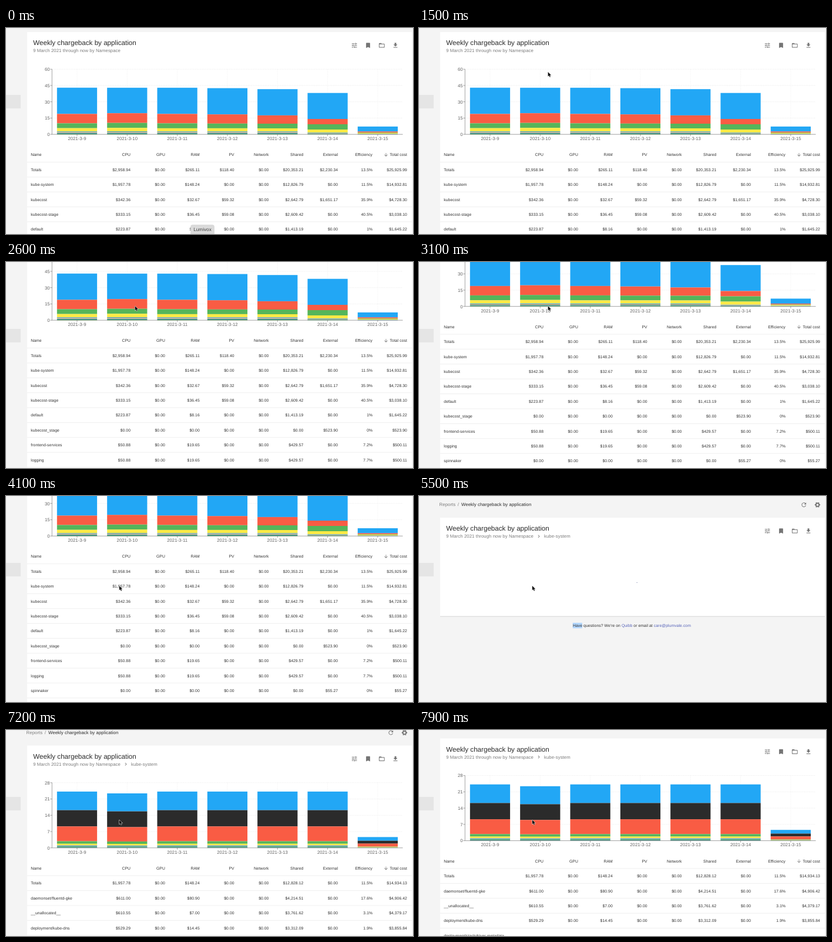
An HTML page for the animation above (8000 ms loop, 693 px wide and 351 px high).

```html
<!DOCTYPE html>
<html lang="en">
<head>
<meta charset="utf-8">
<title>Weekly chargeback report</title>
<style>
  html, body { margin: 0; width: 100%; height: 100%; overflow: hidden; background: #f4f4f4; }
  svg { display: block; width: 693px; height: 351px; font-family: "Liberation Sans", Arial, Helvetica, sans-serif; }
  text { white-space: pre; text-rendering: geometricPrecision; }
  .h5 { font-size: 11.64px; fill: #2a2a2a; }
  .body1 { font-size: 7.76px; letter-spacing: .073px; }
  .body2 { font-size: 6.79px; letter-spacing: .073px; fill: #303030; }
  .axis { font-size: 7.76px; fill: #666; }
  .grey { fill: #7c7c7c; }
  .dark { fill: #2a2a2a; }
  .link { fill: #5562b8; }
</style>
</head>
<body>
<svg id="stage" viewBox="0 0 693 351"></svg>
<script>
const NS = 'http://www.w3.org/2000/svg';
const LOOP = 8000, STEP = 100;
const OPEN = 5500, LOADED = 6300, GROWN = 6700, TIP_END = 300;
const U = 0.485; // page zoom

const add = (parent, tag, attrs = {}, content) => {
  const el = document.createElementNS(NS, tag);
  for (const k in attrs) el.setAttribute(k, attrs[k]);
  if (content !== undefined) el.textContent = content;
  parent.appendChild(el);
  return el;
};
const group = (parent, transform) => add(parent, 'g', transform ? { transform } : {});
const rect = (parent, x, y, width, height, fill, more = {}) =>
  add(parent, 'rect', { x, y, width, height, fill, ...more });
const label = (parent, x, y, str, cls, anchor = 'start') =>
  add(parent, 'text', { x, y, class: cls, 'text-anchor': anchor }, str);
const line = (parent, x1, y1, x2, y2, stroke, more = {}) =>
  add(parent, 'line', { x1, y1, x2, y2, stroke, 'stroke-width': 0.6, ...more });
const icon = (parent, cx, cy, d, scale = U, fill = '#757575') =>
  add(parent, 'path', { d, fill, transform: `translate(${cx} ${cy}) scale(${scale}) translate(-12 -12)` });
const show = (el, on) => el.setAttribute('visibility', on ? 'visible' : 'hidden');

const ICONS = {
  tune: 'M3 17v2h6v-2H3zM3 5v2h10V5H3zm10 16v-2h8v-2h-8v-2h-2v6h2zM7 9v2H3v2h4v2h2V9H7zm14 4v-2H11v2h10zm-6-4h2V7h4V5h-4V3h-2v6z',
  bookmark: 'M17 3H7c-1.1 0-2 .9-2 2v16l7-3 7 3V5c0-1.1-.9-2-2-2z',
  folder: 'M20 6h-8l-2-2H4c-1.1 0-2 .9-2 2v12c0 1.1.9 2 2 2h16c1.1 0 2-.9 2-2V8c0-1.1-.9-2-2-2zm0 12H4V8h16v10z',
  download: 'M19 9h-4V3H9v6H5l7 7 7-7zM5 18v2h14v-2H5z',
  refresh: 'M17.65 6.35A8 8 0 1 0 19.73 14h-2.08A6 6 0 1 1 16.22 7.78L13 11h7V4z',
  next: 'M10 6L8.59 7.41 13.17 12l-4.58 4.59L10 18l6-6z',
  down: 'M20 12l-1.41-1.41L13 16.17V4h-2v12.17l-5.58-5.59L4 12l8 8 8-8z'
};

const BLUE = '#22a7f5', RED = '#f95c44', GREEN = '#55b55a', YELLOW = '#ffea45', BLACK = '#2b2b2b';
const HEAD = ['CPU', 'GPU', 'RAM', 'PV', 'Network', 'Shared', 'External', 'Efficiency', 'Total cost'];

// Each bar lists the heights of its segment tops above the axis.
const overview = {
  ticks: [0, 15, 30, 45, 60],
  colors: [BLUE, RED, GREEN, YELLOW, '#35a0d8', '#e9a655', '#3a93b4', '#3f9f58'],
  bars: [
    [79.5, 34.8, 18.8, 10.5, 5], [79.4, 36, 19.5, 11, 5.2], [79.4, 34.8, 18.8, 10.3, 5],
    [78.7, 34, 18.4, 10.3, 5], [77, 32.3, 18.2, 10.2, 5], [70.5, 26.2, 17.2, 8.2, 3],
    [13.3, 4.8, 3.2, 2.4, 1]
  ],
  rows: [
    'Totals|2,958.94|0.00|265.11|118.40|0.00|20,353.21|2,230.34|13.5%|25,925.99',
    'kube-system|1,957.78|0.00|148.24|0.00|0.00|12,826.79|0.00|11.5%|14,932.81',
    'kubecost|342.36|0.00|32.67|59.32|0.00|2,642.79|1,651.17|35.9%|4,728.30',
    'kubecost-stage|333.15|0.00|36.45|59.08|0.00|2,609.42|0.00|40.5%|3,038.10',
    'default|223.87|0.00|8.16|0.00|0.00|1,413.19|0.00|1%|1,645.22',
    'kubecost_stage|0.00|0.00|0.00|0.00|0.00|0.00|523.90|0%|523.90',
    'frontend-services|50.88|0.00|19.65|0.00|0.00|429.57|0.00|7.2%|500.11',
    'logging|50.88|0.00|19.65|0.00|0.00|429.57|0.00|7.7%|500.11',
    'spinnaker|0.00|0.00|0.00|0.00|0.00|0.00|55.27|0%|55.27'
  ]
};
const fullDay = [95.9, 64.2, 36.5, 11.3, 7, 4.2];
const detail = {
  ticks: [0, 7, 14, 21, 28],
  colors: [BLUE, BLACK, RED, GREEN, YELLOW, '#6f9fc4', '#58b574', '#3b8f86'],
  bars: [
    fullDay, [92.8, 62.2, 35.3, 10.9, 6.8, 4], fullDay, fullDay, fullDay, fullDay,
    [18.4, 12.1, 7.2, 2.1, 1.5, 0.8]
  ],
  rows: [
    'Totals|1,957.78|0.00|148.24|0.00|0.00|12,828.12|0.00|11.5%|14,934.13',
    'daemonset/fluentd-gke|611.00|0.00|80.90|0.00|0.00|4,214.51|0.00|17.6%|4,906.42',
    '__unallocated__|610.55|0.00|7.00|0.00|0.00|3,761.62|0.00|3.1%|4,379.17',
    'deployment/kube-dns|529.29|0.00|14.45|0.00|0.00|3,312.09|0.00|1.9%|3,855.84',
    'deployment/stackdriver-metadata-'
  ]
};

const AX = { left: 78.3, right: 675.6, top: 100.2, base: 211.2 };

function drawChart(parent, data) {
  const band = (AX.right - AX.left) / 7, gap = band * 0.1;
  const unit = (AX.base - AX.top) / 4;
  const dash = { 'stroke-dasharray': '1.45 1.45' };
  data.ticks.forEach((v, i) => {
    const y = AX.base - i * unit;
    if (i) line(parent, AX.left, y, AX.right, y, '#e2e2e2', dash);
    line(parent, AX.left - 3, y, AX.left, y, '#666');
    label(parent, 74.5, y + 2.8, v, 'axis', 'end');
  });
  data.bars.forEach((_, i) => {
    const x = AX.left + (i + 0.5) * band;
    line(parent, x, AX.top, x, AX.base, '#ececec', dash);
  });
  const segments = [];
  data.bars.forEach((tops, i) => {
    const last = tops.length - 1, thin = data.colors.length - last;
    const levels = data.colors.map((_, k) =>
      k <= last ? tops[k] : tops[last] * (1 - (k - last) / thin));
    levels.push(0);
    data.colors.forEach((color, k) => {
      const low = levels[k + 1], h = levels[k] - low;
      const el = rect(parent, AX.left + i * band + gap, AX.base - low - h, band * 0.8, h, color);
      segments.push({ el, low, h });
    });
  });
  line(parent, AX.left, AX.top, AX.left, AX.base, '#666');
  line(parent, AX.left, AX.base, AX.right, AX.base, '#666');
  data.bars.forEach((_, i) => {
    const x = AX.left + (i + 0.5) * band;
    line(parent, x, AX.base, x, AX.base + 3, '#666');
    label(parent, x, AX.base + 9.8, '2021-3-' + (9 + i), 'axis', 'middle');
  });
  return p => segments.forEach(({ el, low, h }) => {
    el.setAttribute('y', AX.base - low - h * p);
    el.setAttribute('height', h * p);
  });
}

function drawTable(parent, rows) {
  const right = i => 212 + i * 58.87;
  const pitch = 25.39, top = 248.4;
  label(parent, 42.3, top, 'Name', 'body2');
  HEAD.forEach((h, i) => label(parent, right(i), top, h, 'body2', 'end'));
  icon(parent, 647, 246, ICONS.down, 0.36);
  line(parent, 36, top + 10.2, 691, top + 10.2, '#e4e4e4');
  rows.forEach((row, r) => {
    const [name, ...cells] = row.split('|');
    const y = top + (r + 1) * pitch;
    label(parent, 42.3, y, name, 'body2');
    cells.forEach((c, i) =>
      label(parent, right(i), y, c.endsWith('%') ? c : '$' + c, 'body2', 'end'));
    if (cells.length) line(parent, 36, y + 10.2, 691, y + 10.2, '#e4e4e4');
  });
}

const stage = document.getElementById('stage');
rect(stage, 0, 0, 693, 351, '#f4f4f4');
rect(stage, 0, 114, 25, 23, '#e5e5e5');
const page = group(stage);

// Header
label(page, 34.6, 17.4, 'Reports', 'body1 grey');
label(page, 65.8, 17.4, '/', 'body1 grey');
label(page, 72, 17.4, 'Weekly chargeback by application', 'body1 dark');
icon(page, 655.3, 15, ICONS.refresh);
const gear = group(page, 'translate(678.5 15)');
add(gear, 'circle', { r: 2.8, fill: 'none', stroke: '#757575', 'stroke-width': 1.9 });
add(gear, 'circle', { r: 4.1, fill: 'none', stroke: '#757575', 'stroke-width': 1.2, pathLength: 12, 'stroke-dasharray': '.9 1.1', 'stroke-dashoffset': 0.45 });

// Card
const cardShadow = rect(page, 36, 204.6, 655, 0.8, '#bdbdbd');
const card = rect(page, 36, 37, 655, 167.6, '#fff');
label(page, 46.2, 59.3, 'Weekly chargeback by application', 'h5');
label(page, 46.2, 71.4, '9 March 2021 through now by Namespace', 'body1 grey');
const crumb = group(page);
icon(crumb, 204, 68.7, ICONS.next, 0.42);
label(crumb, 213, 71.4, 'kube-system', 'body1 grey');
['tune', 'bookmark', 'folder', 'download'].forEach((name, i) =>
  icon(page, 593.2 + i * 23.3, 59.6, ICONS[name]));

const first = group(page);
drawChart(first, overview);
drawTable(first, overview.rows);
const second = group(page);
const growBars = drawChart(second, detail);
drawTable(second, detail.rows);

// Loading state
const waiting = group(page);
rect(waiting, 261.8, 216, 16, 9.4, '#b3d7fe');
const help = label(waiting, 262, 223.1, '', 'body2');
[['Have questions? We\'re on '], ['Quibb', 'link'], [' or email at '], ['care@plumvale.com', 'link']]
  .forEach(([str, cls]) => add(help, 'tspan', cls ? { class: cls } : {}, str));
const spinner = group(waiting);
const arc = add(spinner, 'circle', { r: 20.2, fill: 'none', stroke: '#3f4a80', 'stroke-width': 3.6 });

// Dock label and pointer
const tip = group(stage);
rect(tip, 314.5, 335.5, 40, 18, '#dadada', { rx: 3, stroke: '#cfcfcf', 'stroke-width': 0.5 });
add(tip, 'text', { x: 334.5, y: 346.4, 'font-size': 8.2, fill: '#444', 'text-anchor': 'middle' }, 'Lumivox');
const pointer = add(stage, 'path', {
  d: 'M0 0V7.6L1.8 6 3 8.8 4.3 8.2 3.1 5.5H5.5Z',
  fill: '#111', stroke: '#fff', 'stroke-width': 0.9, 'paint-order': 'stroke'
});

const mix = (a, b, p) => a + (b - a) * p;
const clamp = p => Math.min(1, Math.max(0, p));
const easeInOut = p => p * p * (3 - 2 * p);
const easeOut = p => 1 - (1 - p) ** 2;

// Value at time t along [time, value] keys
function along(keys, t) {
  if (t <= keys[0][0]) return keys[0][1];
  for (let i = 1; i < keys.length; i++) {
    const [t0, v0] = keys[i - 1], [t1, v1] = keys[i];
    if (t <= t1) return mix(v0, v1, (t - t0) / (t1 - t0));
  }
  return keys[keys.length - 1][1];
}

const scrollFirst = [[1800, 30], [1900, 36], [2000, 48], [2100, 62], [2300, 86], [2500, 105],
  [2700, 119], [2900, 129], [3100, 135.5], [3300, 140.5], [3500, 143]];
const scrollSecond = [[6900, 0], [7000, 2], [7100, 6], [7200, 10.4], [7400, 16.5], [7600, 20.8], [7800, 22.6]];

function moveSpinner(ms) {
  const p = (ms % 1400) / 1400;
  const a = easeInOut(clamp(p * 2)), b = easeInOut(clamp(p * 2 - 1));
  arc.setAttribute('stroke-dasharray', `${mix(1, 100, a)} 200`);
  arc.setAttribute('stroke-dashoffset', -(15 * a + 110 * b));
  spinner.setAttribute('transform', `translate(362.3 147.3) scale(${U * 40 / 44}) rotate(${360 * p})`);
}

function movePointer(t) {
  const rise = easeInOut(clamp((t - TIP_END) / 1000));
  const drop = easeInOut(clamp((t - 3500) / 500));
  const x = mix(mix(333, 219.6, rise), 192.8, drop);
  const y = mix(mix(350, 75, rise), 153, drop);
  pointer.setAttribute('transform', `translate(${x} ${y})`);
  show(pointer, t >= TIP_END);
}

function render(t) {
  const opened = t >= OPEN, loading = opened && t < LOADED;
  const scroll = along(opened ? scrollSecond : scrollFirst, t);
  page.setAttribute('transform', `translate(0 ${-scroll})`);
  card.setAttribute('height', loading ? 167.6 : 600);
  show(cardShadow, loading);
  show(first, !opened);
  show(second, t >= LOADED);
  show(crumb, opened);
  show(waiting, loading);
  show(tip, t < TIP_END);
  growBars(easeOut(clamp((t - LOADED) / (GROWN - LOADED))));
  moveSpinner(Math.max(0, t - OPEN));
  movePointer(t);
}

function tick() {
  const t = performance.now() % LOOP;
  render(Math.floor(t / STEP) * STEP);
  requestAnimationFrame(tick);
}
tick();
</script>
</body>
</html>
```
